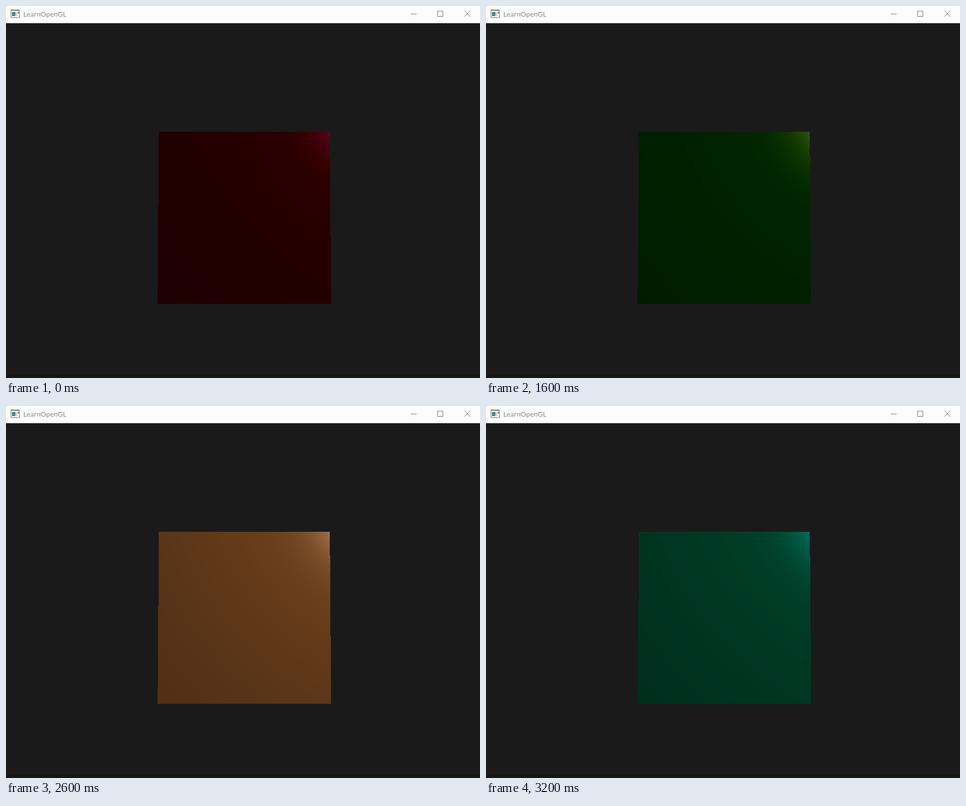
Write an HTML page with a canvas that moves like this. It is 798x627 px and loops after 3.6 s.

```html
<!DOCTYPE html>
<html lang="en">
<head>
<meta charset="utf-8">
<title>LearnOpenGL</title>
<style>
  html, body { margin: 0; width: 100%; height: 100%; overflow: hidden; background: #1a1a1a; }
  canvas { display: block; }
</style>
</head>
<body>
<canvas id="stage" width="798" height="627"></canvas>
<script>
const ctx = document.getElementById('stage').getContext('2d');
const LOOP = 3600, STEP = 100;

// Screen box of the cube's front face
const X0 = 255, Y0 = 212, W = 292, H = 290;
const LIGHT = [1.2, 1, 2], EYE = [0, 0, 3];
const MATERIAL = [1, 0.5, 0.31];
const SHININESS = 32, SPECULAR = 0.5;

const face = ctx.createImageData(W, H);
const diffuse = new Float32Array(W * H);
const specular = new Float32Array(W * H);

const unit = v => {
  const len = Math.hypot(...v);
  return v.map(c => c / len);
};
const toward = (from, to) => unit(to.map((c, i) => c - from[i]));

function rect(color, x, y, w, h) {
  ctx.fillStyle = color;
  ctx.fillRect(x, y, w, h);
}

function line(...p) {
  ctx.beginPath();
  ctx.moveTo(p[0], p[1]);
  ctx.lineTo(p[2], p[3]);
  ctx.stroke();
}

// Phong terms only depend on position, so they are computed once
function prepareFace() {
  for (let j = 0; j < H; j++) {
    const y = Y0 + j;
    const left = 256.5 - (y - 337) / 137;
    const right = 545.5 + (y - 252) / 135;
    for (let i = 0; i < W; i++) {
      const x = X0 + i + 0.5;
      const k = j * W + i;
      const inside = x >= left && x <= right;
      face.data[k * 4 + 3] = inside ? 255 : 0;
      if (!inside) continue;
      const point = [(x - left) / (right - left) - 0.5, 0.5 - (j + 0.5) / H, 0.5];
      const l = toward(point, LIGHT);
      const v = toward(point, EYE);
      const shine = Math.max(0, l[2] * v[2] - l[0] * v[0] - l[1] * v[1]);
      diffuse[k] = 255 * (0.1 + 0.5 * l[2]);
      specular[k] = 255 * SPECULAR * Math.pow(shine, SHININESS);
    }
  }
}

function drawFace(ms) {
  const t = 17.12 + 1.08 * ms / 1000;
  const tint = [2, 0.7, 1.3].map((speed, c) => Math.sin(speed * t) * MATERIAL[c]);
  for (let k = 0; k < W * H; k++) {
    for (let c = 0; c < 3; c++) {
      face.data[k * 4 + c] = tint[c] * diffuse[k] + specular[k];
    }
  }
  const layer = drawFace.layer ||= new OffscreenCanvas(W, H);
  layer.getContext('2d').putImageData(face, 0, 0);
  ctx.drawImage(layer, X0, Y0);
}

function drawWindow() {
  rect('#1a1a1a', 0, 0, 798, 627);
  rect('#171717', 0, 622, 798, 5);
  rect('#fcfcfa', 0, 0, 798, 29);

  // Window icon
  rect('#7d8787', 8, 6, 15, 14);
  rect('#f4f6f5', 9, 8, 13, 11);
  rect('#4d8a85', 10, 10, 6, 7);
  rect('#c3cbca', 17, 10, 2, 7);
  rect('#8d9897', 20, 10, 2, 3);

  ctx.fillStyle = '#8b8a95';
  ctx.font = '12px Lato, sans-serif';
  ctx.textBaseline = 'alphabetic';
  ctx.fillText('LearnOpenGL', 29, 18);

  // Minimise, maximise, close
  rect('#858585', 681, 13, 10, 1);
  ctx.strokeStyle = '#858585';
  ctx.lineWidth = 1;
  ctx.strokeRect(726.5, 8.5, 9, 9);
  line(772, 8, 782, 18);
  line(782, 8, 772, 18);
}

prepareFace();
const start = performance.now();
let shown = -1;

function tick() {
  const ms = Math.max(0, performance.now() - start) % LOOP;
  const step = Math.floor(ms / STEP);
  if (step !== shown) {
    shown = step;
    drawWindow();
    drawFace(step * STEP);
  }
  requestAnimationFrame(tick);
}
tick();
</script>
</body>
</html>
```
